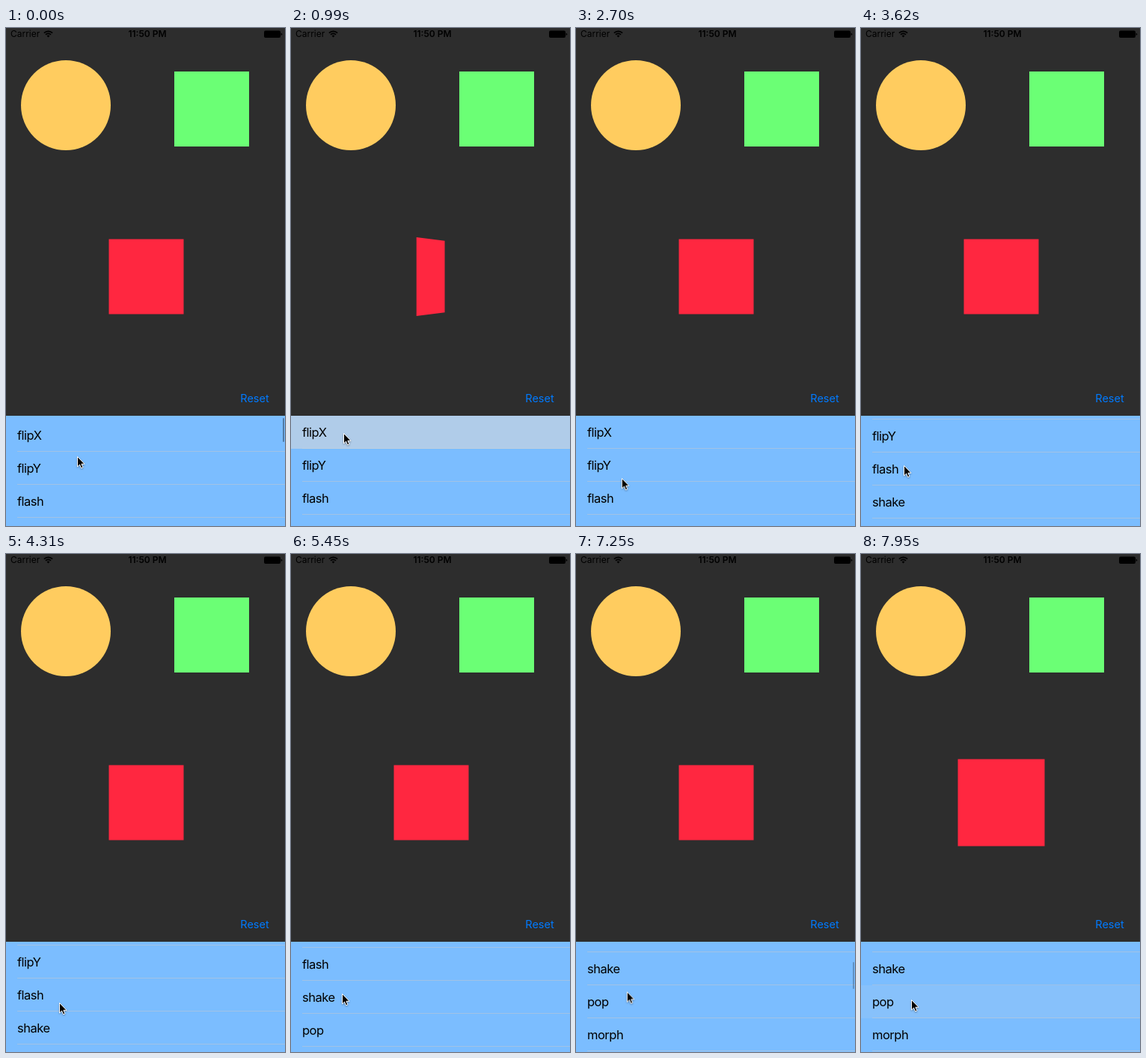
These frames come from a looping animation (373 by 664 pixels, 8000 ms). An HTML page:

```html
<!DOCTYPE html>
<html lang="en">
<head>
<meta charset="utf-8">
<title>Animation list</title>
<style>
  html, body { margin: 0; width: 100%; height: 100%; overflow: hidden; background: #2d2d2d; }
  .stage {
    position: relative; width: 373px; height: 664px; overflow: hidden;
    background: #2d2d2d; color: #000; font-family: Inter, Roboto, sans-serif;
  }
  .stage > * { position: absolute; }

  /* Every animation shares one 8 s clock: 1% = 80 ms */
  .bar, .list, .thumb, .cursor, .red, .row i { animation: 8s linear infinite; }

  .bar-text { top: 0; font-size: 12px; line-height: 16px; white-space: nowrap; }
  .carrier { left: 6px; }
  .clock { left: 139px; width: 100px; text-align: center; font-weight: 600; }
  .icons { left: 0; top: 0; }

  .circle { left: 20px; top: 43px; width: 120px; height: 120px; border-radius: 50%; background: #ffcc5f; }
  .green { left: 225px; top: 58px; width: 100px; height: 100px; background: #6bff75; }
  .lens { left: 137px; top: 281px; width: 100px; height: 100px; perspective: 1000px; }
  .stage .red {
    width: 100px; height: 100px; background: #ff2740; translate: .5px .5px;
    animation-name: flip, flash, shake, pop;
  }
  .reset {
    left: 293px; top: 484px; width: 79px; text-align: center;
    font-size: 14.5px; line-height: 20px; color: #007aff;
  }

  .table { left: 0; top: 517px; width: 375px; height: 150px; overflow: hidden; background: #7bbdff; }
  .stage .list { animation-name: scroll; }
  .row { position: relative; height: 44px; font-size: 16.5px; line-height: 44px; letter-spacing: -.5px; }
  .row::after {
    content: ""; position: absolute; left: 15px; right: 0; bottom: 0;
    height: 1px; background: rgba(200, 199, 204, .5);
  }
  .row i {
    position: absolute; z-index: 1; inset: 0; opacity: 0;
    background: #d9d9d9; box-shadow: 0 -1px #7bbdff;
  }
  .stage .row i { animation-name: tap; animation-delay: var(--at); }
  .row span { position: absolute; z-index: 2; left: 15px; top: 0; }

  .thumb {
    left: 369.5px; top: 520px; width: 2.5px; height: 36px; border-radius: 1.25px;
    background: rgba(0, 0, 0, .35);
  }
  .stage .thumb { animation-name: thumb-move, thumb-fade; }
  .cursor { left: -1px; top: -1px; overflow: visible; filter: drop-shadow(0 1px 1px rgba(0, 0, 0, .35)); }
  .stage .cursor { animation-name: point; animation-timing-function: ease-in-out; }

  @keyframes tap {
    0% { opacity: 1; }
    .75% { opacity: 1; animation-timing-function: ease-in-out; }
    5.4%, 100% { opacity: 0; }
  }
  @keyframes flip {
    0% { rotate: y 0deg; }
    10.25% { rotate: y 0deg; animation-timing-function: ease-in-out; }
    15.25% { rotate: y 180deg; }
    15.26% { rotate: x 0deg; }
    26.5% { rotate: x 0deg; animation-timing-function: ease-in-out; }
    31.5% { rotate: x 180deg; }
    31.51%, 100% { rotate: x 0deg; }
  }
  @keyframes flash {
    0%, 49.125%, 53.9%, 54.6%, 59.125%, 100% { opacity: 1; animation-timing-function: ease-in-out; }
    51.5%, 56.75% { opacity: 0; animation-timing-function: ease-in-out; }
  }
  @keyframes shake {
    0%, 72.5%, 77.5%, 100% { translate: .5px .5px; }
    73.75%, 76.25% { translate: 30.5px .5px; }
    75% { translate: -29.5px .5px; }
  }
  @keyframes pop {
    0% { scale: 1; }
    96% { scale: 1; animation-timing-function: ease-in; }
    99.375%, 100% { scale: 1.16; }
  }
  @keyframes scroll {
    0% { transform: translateY(4px); }
    .625% { transform: translateY(4px); animation-timing-function: ease-out; }
    5.25% { transform: translateY(0); }
    34.625% { transform: translateY(0); animation-timing-function: ease-in-out; }
    38% { transform: translateY(-39px); }
    58.25% { transform: translateY(-39px); animation-timing-function: ease-in-out; }
    61.5%, 64.375% { transform: translateY(-81px); }
    65.625% { transform: translateY(-80px); }
    81.5% { transform: translateY(-80px); animation-timing-function: ease-in-out; }
    86.125%, 100% { transform: translateY(-118px); }
  }
  @keyframes thumb-move {
    0%, .625% { height: 32px; transform: translateY(0); }
    5.25% { height: 36px; transform: translateY(0); }
    34.625% { height: 36px; transform: translateY(0); animation-timing-function: ease-in-out; }
    38% { height: 36px; transform: translateY(8px); }
    58.25% { height: 36px; transform: translateY(8px); animation-timing-function: ease-in-out; }
    61.5%, 81.5% { height: 36px; transform: translateY(16.5px); animation-timing-function: ease-in-out; }
    86.125%, 100% { height: 36px; transform: translateY(24px); }
  }
  @keyframes thumb-fade {
    0%, 3.5%, 35%, 42.5%, 58.9%, 64.375%, 82.1%, 89.875% { opacity: 1; }
    6.5%, 34.4%, 45.25%, 58.25%, 67.5%, 81.5%, 92.1%, 100% { opacity: 0; }
  }
  @keyframes point {
    0%, .625% { transform: translate(95px, 571px); }
    6%, 17.125% { transform: translate(70px, 540px); }
    21.25%, 31.25% { transform: translate(57px, 583px); }
    34.25%, 34.625% { transform: translate(61px, 601px); }
    38%, 42.125% { transform: translate(59px, 562px); }
    45.25%, 50.75% { transform: translate(57px, 583px); }
    53.6%, 54.6% { transform: translate(71px, 598px); }
    57.5%, 58.25% { transform: translate(71px, 603px); }
    61.5%, 64.375% { transform: translate(70px, 561px); }
    68.1%, 75% { transform: translate(68px, 586px); }
    78.75%, 81.5% { transform: translate(71px, 618px); }
    86.125%, 89.875% { transform: translate(68px, 580px); }
    92.1%, 100% { transform: translate(67px, 594px); }
  }
</style>
</head>
<body>
<div class="stage">
  <div class="bar-text carrier">Carrier</div>
  <div class="bar-text clock">11:50 PM</div>
  <svg class="icons" width="373" height="20">
    <g fill="none" stroke="#000" stroke-width="1.7">
      <path d="M50.9 6.7A7.9 7.9 0 0 1 62.1 6.7M53 8.8A4.9 4.9 0 0 1 60 8.8"/>
    </g>
    <path d="M56.5 12.4L54.6 10.5A2.6 2.6 0 0 1 58.4 10.5Z"/>
    <rect x="345" y="3.5" width="22" height="9.5" rx="2"/>
    <path d="M367.6 6.5Q369.2 7 369.2 8.2T367.6 10Z"/>
  </svg>

  <div class="circle"></div>
  <div class="green"></div>
  <div class="lens"><div class="red"></div></div>
  <div class="reset">Reset</div>

  <div class="table">
    <div class="list">
      <div class="row"><i style="--at:760ms"></i><span>flipX</span></div>
      <div class="row"><i style="--at:2060ms"></i><span>flipY</span></div>
      <div class="row"><i style="--at:3860ms"></i><span>flash</span></div>
      <div class="row"><i style="--at:5740ms"></i><span>shake</span></div>
      <div class="row"><i style="--at:7610ms"></i><span>pop</span></div>
      <div class="row"><span>morph</span></div>
    </div>
  </div>
  <div class="thumb"></div>

  <svg class="cursor" width="14" height="20">
    <path d="M1.5 1.5V15L4.6 12.1L6.6 16.9L8.9 15.9L6.9 11.3H11Z" stroke="#fff" stroke-width="1"/>
  </svg>
</div>
</body>
</html>
```
